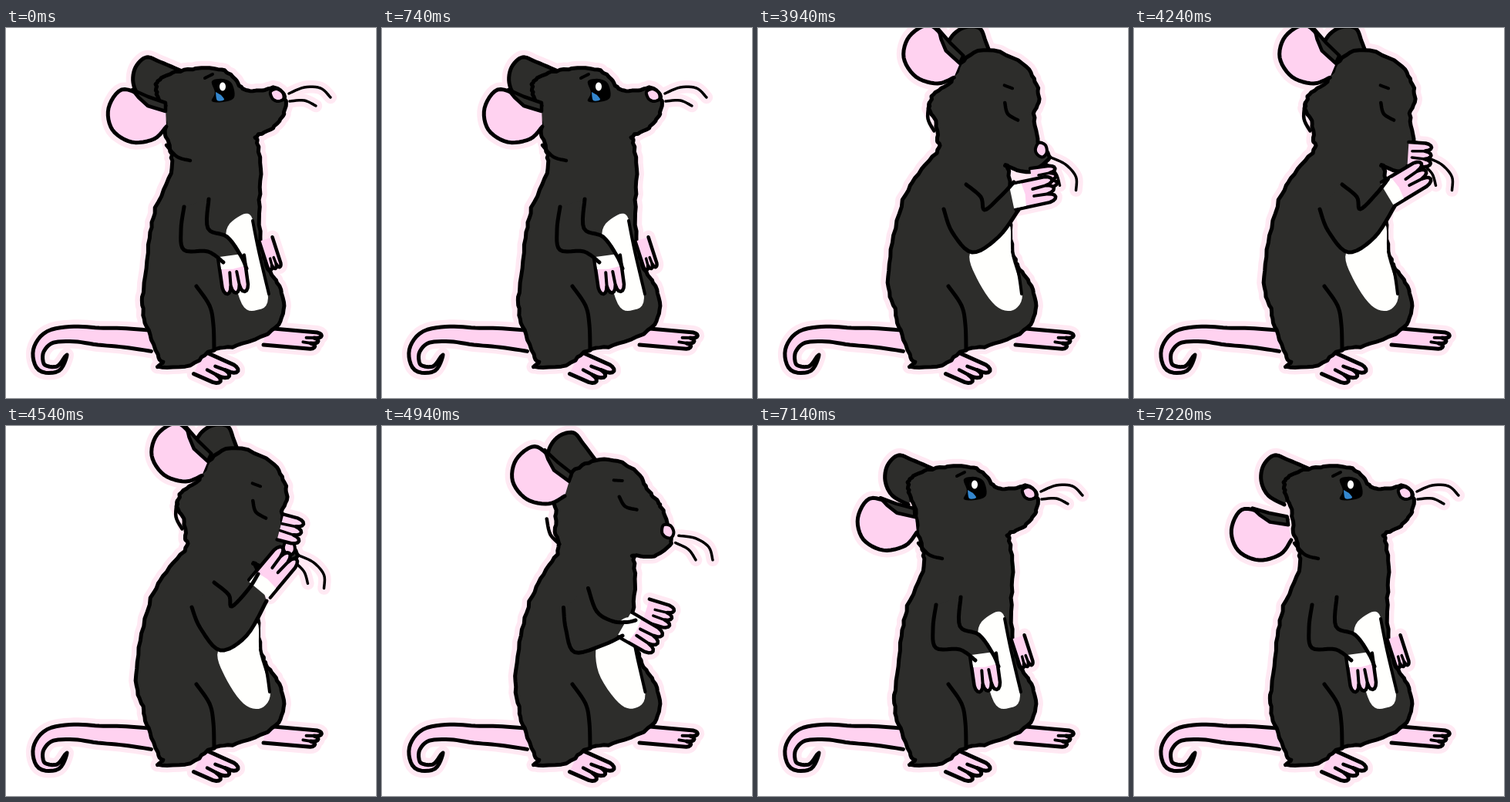
These frames come from a looping animation (480 px wide and 480 px high, 7.3 s). An HTML page:

```html
<!DOCTYPE html>
<html lang="en">
<head>
<meta charset="utf-8">
<title>Mouse</title>
<style>
html, body { margin: 0; width: 100%; height: 100%; overflow: hidden; background: #fff; }
svg { display: block; width: 100vw; height: 100vh; }
path { stroke-linecap: round; stroke-linejoin: round; }
</style>
</head>
<body>
<svg id="stage" viewBox="0 0 480 480"></svg>
<script>
const DARK = '#2d2d2b', PINK = '#ffd2f0', WHITE = '#fffffd', BLUE = '#3487cf', HALO = '#ffe9f3';
const LOOP = 7300;

const pts = text => text.trim().split(/\s+/).map(pair => pair.split(',').map(Number));

// Blends numbers, point lists and whole poses alike
function mix(a, b, t) {
  if (typeof a === 'number') return a + (b - a) * t;
  if (Array.isArray(a)) return a.map((v, i) => mix(v, b[i], t));
  return Object.fromEntries(Object.keys(a).map(key => [key, mix(a[key], b[key], t)]));
}

// Rotates points about a pivot and moves that pivot to x, y
function place(points, [px, py], { x, y, angle }) {
  const c = Math.cos(angle * Math.PI / 180), s = Math.sin(angle * Math.PI / 180);
  return points.map(([u, v]) => [x + (u - px) * c - (v - py) * s, y + (u - px) * s + (v - py) * c]);
}

// Samples a Catmull-Rom spline
function curve(points, closed) {
  const n = points.length, steps = 6, out = [];
  const at = i => closed ? points[(i + n) % n] : points[Math.max(0, Math.min(n - 1, i))];
  for (let i = 0; i < (closed ? n : n - 1); i++) {
    const [a, b, c, d] = [at(i - 1), at(i), at(i + 1), at(i + 2)];
    for (let j = 0; j < steps; j++) {
      const t = j / steps;
      out.push(b.map((v, k) => v + t * (c[k] - a[k]) / 2
        + t * t * (a[k] - 2.5 * v + 2 * c[k] - d[k] / 2)
        + t * t * t * (1.5 * (v - c[k]) + (d[k] - a[k]) / 2)));
    }
  }
  return closed ? out : [...out, points[n - 1]];
}

const noise = i => { const r = Math.sin(i * 12.9898) * 43758.5453; return r - Math.floor(r) - 0.5; };
const furry = points => points.map(([x, y], i) => [x + 2.4 * noise(i), y + 1.6 * noise(i + 500)]);

const ellipse = (x, y, rx, ry) => Array.from({ length: 10 }, (_, i) =>
  [x + rx * Math.cos(i * Math.PI / 5), y + ry * Math.sin(i * Math.PI / 5)]);

// Ribbon around a centre line, thinning out to its tip
function taper(line, half) {
  const mid = curve(line), last = mid.length - 1;
  const side = sign => mid.map(([x, y], i) => {
    const a = mid[Math.max(0, i - 1)], b = mid[Math.min(last, i + 1)];
    const dx = b[0] - a[0], dy = b[1] - a[1];
    const w = sign * half * (1 - i / last) ** 0.7 / Math.hypot(dx, dy);
    return [x - dy * w, y + dx * w];
  });
  return [...side(1), ...side(-1).reverse()];
}

// A limb end with three rounded toes; `slant` shortens the lower ones
function paw(limb) {
  const { len, half, slant = 0 } = limb, r = half / 3;
  const reach = i => len * (1 - slant * i / 2);
  const outline = [[0, -half]];
  for (let i = 0; i < 3; i++) {
    for (let a = -1.35; a < 1.4; a += 0.45) {
      outline.push([reach(i) - 2 * r + 2 * r * Math.cos(a), (i - 1) * 2 * r + r * Math.sin(a)]);
    }
  }
  outline.push([0, half]);
  const put = points => place(points, [0, 0], limb);
  return {
    skin: [put(outline)],
    toes: [0, 1].map(i => put([[reach(i + 0.5) - 1.6 * r, (2 * i - 1) * r],
      [reach(i + 0.5) - 4.8 * r, (2 * i - 1) * r * 0.8]])),
    cuff: [put([[-2, -half + 2], [14, -half + 2], [16, 0], [14, half - 2], [-2, half - 2]])]
  };
}

const EYE = [281, 75], EAR_ROOT = [209, 114];
const skull = pts(`207,138 204,108 196,86 196,71 212,60 241,53 275,53 294,63 308,79 328,81
  351,78 362,92 360,112 346,129 326,140`);
const face = {
  farEar: pts('195,102 174,90 165,71 168,51 182,38 200,44 226,55'),
  cheek: pts('208,152 222,167 239,172'),
  brow: pts('258,65 268,60'),
  nose: pts('343,83 351,79 359,84 360,92 353,95 346,92'),
  eye: pts('267,69 281,66 293,72 296,90 282,96 267,95 271,84'),
  iris: pts('272,83 274,94 283,93 279,87'),
  shine: ellipse(281, 76, 4, 5.5),
  lid: pts('264,65 281,60 298,68 298,84 282,83 264,82'),
  shut: pts('275,80 288,87 303,83'),
  whiskerTop: pts('367,85 387,77 408,78 421,90'),
  whiskerLow: pts('368,95 387,94 402,101')
};
const ear = pts('208,128 192,144 163,148 138,132 133,104 150,80 178,88 207,101');
const fold = pts('164,80 184,89 207,97 207,108 184,101 172,90');
const lower = pts(`177,364 184,392 198,428 204,434 198,440 240,437 268,418 300,412
  345,393 361,366 354,334 342,316`);

const up = {
  head: { x: 281, y: 75, angle: 0 },
  ear: { x: 209, y: 114, angle: 0 },
  skull,
  back: pts('214,160 214,188 194,233 186,273 180,330'),
  front: pts('332,285 328,240 331,190 326,150'),
  belly: pts('303,244 318,244 326,280 340,350 325,366 306,358 290,300 286,262'),
  chest: pts('320,250 328,290 341,345'),
  armTop: pts('263,222 262,260 287,271 305,296 312,312'),
  armLow: pts('231,232 227,262 231,288 262,290 282,304'),
  near: { x: 292, y: 297, angle: 82, len: 47, half: 17 },
  far: { x: 337, y: 274, angle: 72, len: 40, half: 9 }
};
const flick = { ...up, ear: { x: 203, y: 134, angle: -8 } };

const nod = { x: 303, y: 83, angle: 13.3 };
const ahead = {
  head: nod,
  ear: { x: 224, y: 104, angle: 13.3 },
  skull: place(skull, EYE, nod),
  back: pts('224,165 211,195 195,232 186,266 178,318'),
  front: pts('330,285 323,250 329,205 329,167'),
  belly: pts('303,244 318,244 323,270 340,350 325,366 306,358 278,315 284,266'),
  chest: pts('320,250 326,290 341,345'),
  armTop: pts('265,218 268,262 303,270 320,290 326,304'),
  armLow: pts('230,236 225,262 222,296 265,296 286,308'),
  near: { x: 301, y: 297, angle: 72, len: 42, half: 19 },
  far: { x: 330, y: 282, angle: 42, len: 38, half: 16 }
};

const wash = {
  head: { x: 328, y: 98, angle: 47 },
  ear: { x: 261, y: 52, angle: 25 },
  skull: pts(`233,146 230,120 222,104 228,86 250,70 266,42 298,28 343,46 360,70 364,92
    358,116 364,148 378,168 352,186 324,180`),
  back: pts('234,158 208,189 188,223 174,279 169,330'),
  front: pts('332,296 327,262 328,220 324,182'),
  belly: pts('303,270 326,255 329,295 343,345 331,366 308,360 284,325 275,292'),
  chest: pts('330,290 338,318 342,345'),
  armTop: pts('270,203 289,219 294,236 314,219 332,200'),
  armLow: pts('241,235 252,265 278,291 312,271 338,236'),
  near: { x: 331, y: 219, angle: -12, len: 54, half: 17 },
  far: { x: 355, y: 196, angle: -8, len: 32, half: 14 }
};
const rub = {
  ...wash,
  armTop: pts('270,203 289,219 293,234 315,211 327,192'),
  armLow: pts('241,235 252,262 278,291 312,272 338,227'),
  near: { x: 329, y: 211, angle: -50, len: 60, half: 18 },
  far: { x: 356, y: 131, angle: 15, len: 28, half: 17 }
};
const turn = mix(ahead, wash, 0.5);

const tail = taper(pts('190,406 155,402 120,400 88,397 57,401 42,419 46,440 67,442 79,424'), 13.5);
const nearFoot = paw({ x: 250, y: 434, angle: 24, len: 51, half: 16, slant: 0.3 });
const farFoot = paw({ x: 335, y: 400, angle: 5, len: 74, half: 11, slant: 0.1 });

// Every part of a pose as a list of point lists
function build(pose) {
  const parts = {};
  for (const name in face) {
    const closed = ['nose', 'eye', 'shine'].includes(name);
    parts[name] = [curve(place(face[name], EYE, pose.head), closed)];
  }
  for (const name of ['chest', 'armTop', 'armLow']) parts[name] = [curve(pose[name])];
  const near = paw(pose.near), far = paw(pose.far);
  return {
    ...parts,
    tail: [tail],
    nearFoot: nearFoot.skin, nearToes: nearFoot.toes,
    farFoot: farFoot.skin, farToes: farFoot.toes,
    figure: [furry(curve([...pose.back, ...lower, ...pose.front, ...[...pose.skull].reverse()], true))],
    belly: [curve(pose.belly, true)],
    haunch: [curve(pts('247,335 264,360 269,385 270,418'))],
    arm: [[...parts.armTop[0], ...[...parts.armLow[0]].reverse()]],
    nearPaw: near.skin, nearFingers: near.toes, cuff: near.cuff,
    farPaw: far.skin, farFingers: far.toes,
    ear: [curve(place(ear, EAR_ROOT, pose.ear))],
    fold: [place(fold, EAR_ROOT, pose.ear)]
  };
}

// name, fill, line width, closed, halo
const layers = [
  ['tail', PINK, 5, 0, 1], ['farFoot', PINK, 5, 0, 1], ['farToes', 'none', 4],
  ['nearFoot', PINK, 5, 0, 1], ['nearToes', 'none', 4.5], ['farEar', DARK, 5, 0, 1],
  ['figure', DARK, 5, 1, 1], ['belly', WHITE, 0, 1], ['chest', 'none', 4],
  ['haunch', 'none', 5], ['cheek', 'none', 4.5], ['brow', 'none', 4], ['nose', PINK, 4, 1],
  ['eye', '#000', 0, 1], ['iris', BLUE, 0, 1], ['shine', '#fff', 0, 1],
  ['lid', DARK, 0, 1], ['shut', 'none', 4.5],
  ['whiskerTop', 'none', 3.5, 0, 1], ['whiskerLow', 'none', 3.5, 0, 1],
  ['farPaw', PINK, 4.5, 0, 1], ['farFingers', 'none', 3.5],
  ['arm', DARK, 0, 1], ['nearPaw', PINK, 4.5, 0, 1], ['cuff', WHITE, 0, 1],
  ['nearFingers', 'none', 4], ['armTop', 'none', 5], ['armLow', 'none', 5],
  ['ear', PINK, 5, 0, 1], ['fold', DARK, 4.5, 1, 1]
];

const stage = document.getElementById('stage');
function addPath(fill, stroke, width) {
  const path = document.createElementNS('http://www.w3.org/2000/svg', 'path');
  path.setAttribute('fill', fill);
  path.setAttribute('stroke', width ? stroke : 'none');
  path.setAttribute('stroke-width', width);
  return stage.appendChild(path);
}
const halos = {}, inks = {};
for (const [name, , width, , halo] of layers) if (halo) halos[name] = addPath('none', HALO, width + 13);
for (const [name, fill, width] of layers) inks[name] = addPath(fill, '#000', width);

const HIDDEN = {
  open: ['lid', 'shut'],
  half: ['shut'],
  shut: ['eye', 'iris', 'shine', 'lid']
};

function poseAt(t) {
  if (t >= 7140) return [mix(up, flick, t < 7220 ? 0.5 : 1), 'open'];
  if (t >= 500 && t < 740) return [up, t >= 580 && t < 660 ? 'shut' : 'half'];
  if (t < 3740 || t >= 5140) return [up, 'open'];
  const step = Math.floor((t - 3740) / 100);
  if (step === 0 || step === 13) return [ahead, 'open'];
  if (step === 1 || step === 12) return [turn, 'shut'];
  const lift = (1 - Math.cos(Math.min(step - 2, 8) * Math.PI / 2)) / 2;
  return [mix(wash, rub, lift), 'shut'];
}

function draw(t) {
  const [pose, eyes] = poseAt(t), parts = build(pose);
  for (const [name, , , closed] of layers) {
    const d = HIDDEN[eyes].includes(name) ? ''
      : parts[name].map(line => 'M' + line.join('L') + (closed ? 'Z' : '')).join('');
    inks[name].setAttribute('d', d);
    if (halos[name]) halos[name].setAttribute('d', d);
  }
}

const start = performance.now();
function tick() {
  draw((performance.now() - start) % LOOP);
  requestAnimationFrame(tick);
}
tick();
</script>
</body>
</html>
```
